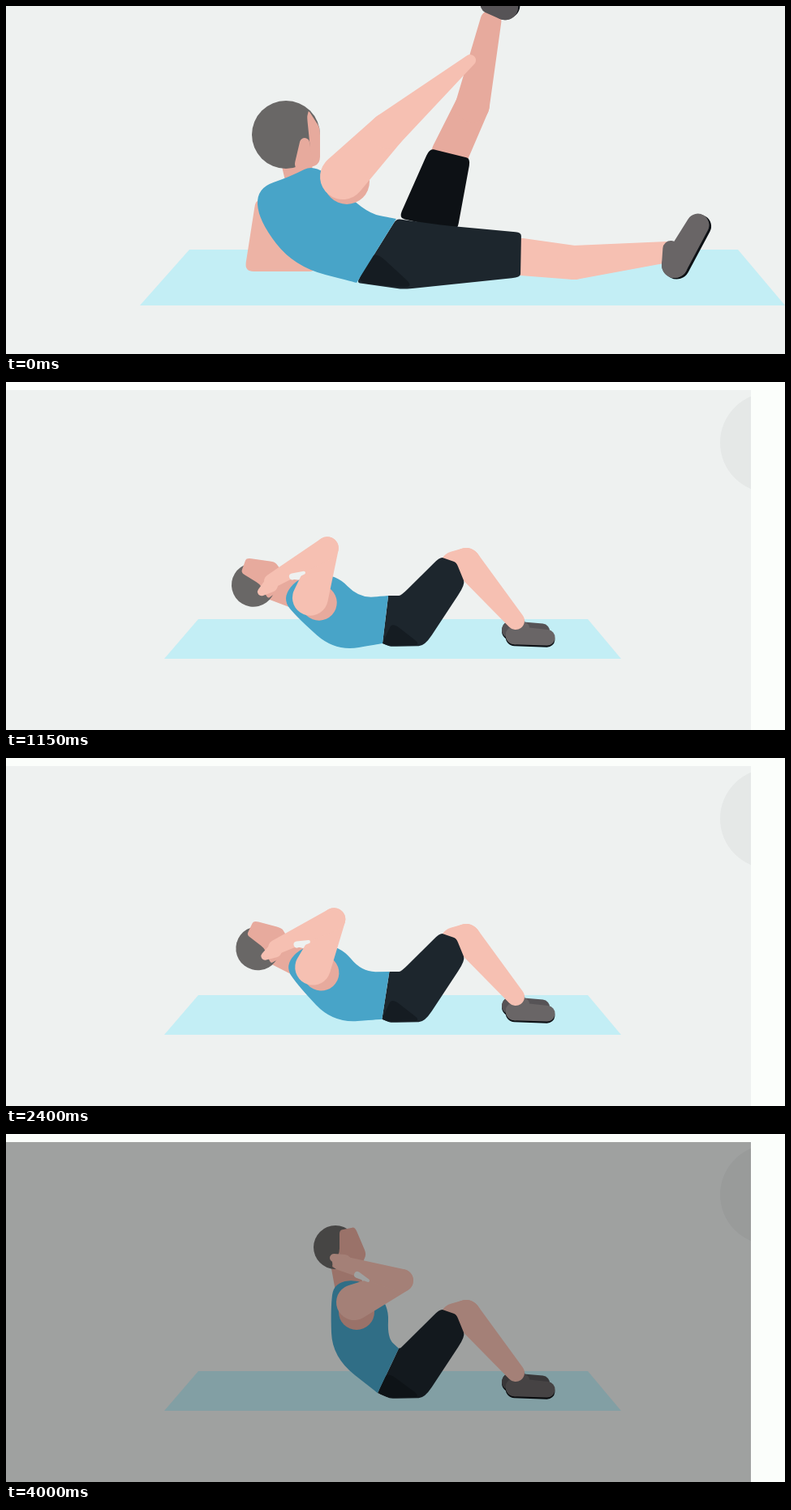
An HTML page with a canvas for the animation above (4.05 s loop, 960 by 430 pixels).

```html
<!DOCTYPE html>
<html lang="en">
<head>
<meta charset="utf-8">
<title>Floor exercises</title>
<style>
html, body { margin: 0; width: 960px; height: 430px; overflow: hidden; background: #eef1f0; }
canvas { display: block; }
</style>
</head>
<body>
<canvas id="stage" width="960" height="430"></canvas>
<script>
const ctx = document.getElementById('stage').getContext('2d');
const LOOP = 4050, CUT = 1100, DIM = 3300;
const BG = '#eef1f0', MAT = '#c3eef5', SKIN = '#f6c0b2', FAR_ARM = '#edb3a5', SHADE = '#e7aa9d';
const HAIR = '#696766', SHIRT = '#48a4c8', PANTS = '#1d262d', HIP = '#151c22', BLACK = '#0d1115';
const SHOE = '#696566', FAR_SHOE = '#565356';

const rad = deg => deg * Math.PI / 180;
const mix = (p, a, b) => a + (b - a) * p;
const between = (p, a, b) => a.map((v, i) => mix(p, v, b[i]));
const ease = (t, from, to) => {
  const k = Math.min(1, Math.max(0, (t - from) / (to - from)));
  return (1 - Math.cos(Math.PI * k)) / 2;
};
const spin = ([x, y], [cx, cy], deg) => {
  const c = Math.cos(rad(deg)), s = Math.sin(rad(deg));
  return [cx + (x - cx) * c - (y - cy) * s, cy + (x - cx) * s + (y - cy) * c];
};

function within([x, y], deg, paint) {
  ctx.save();
  ctx.translate(x, y);
  ctx.rotate(rad(deg));
  paint();
  ctx.restore();
}

function disc(color, x, y, r) {
  ctx.fillStyle = color;
  ctx.beginPath();
  ctx.arc(x, y, r, 0, 7);
  ctx.fill();
}

// Closed outline; soft 0 keeps the corners, 1 gives a smooth spline
function outline(color, soft, ...pts) {
  const n = pts.length;
  ctx.fillStyle = color;
  ctx.beginPath();
  pts.forEach((v, i) => {
    ctx.lineTo(...between(soft / 2, v, pts[(i + n - 1) % n]));
    ctx.quadraticCurveTo(...v, ...between(soft / 2, v, pts[(i + 1) % n]));
  });
  ctx.fill();
}

// Chain of round joints [x, y, radius] joined by tapering segments
function limb(color, ...joints) {
  ctx.fillStyle = color;
  for (let i = 1; i < joints.length; i++) {
    const [x1, y1, r1] = joints[i - 1], [x2, y2, r2] = joints[i];
    const a = Math.atan2(y2 - y1, x2 - x1);
    const b = Math.acos((r1 - r2) / Math.hypot(x2 - x1, y2 - y1));
    ctx.beginPath();
    ctx.arc(x1, y1, r1, a + b, a - b + 2 * Math.PI);
    ctx.arc(x2, y2, r2, a - b, a + b);
    ctx.fill();
  }
}

// Heel at the origin, toe along x, sole below
function shoe(color, heel, deg, size) {
  within(heel, deg, () => {
    ctx.scale(size, size);
    limb(BLACK, [0, 3, 16], [57, 3, 14]);
    limb(color, [15, -14, 10], [0, 0, 16], [57, 0, 14]);
  });
}

// p: 0 leg low, 1 leg raised
function legRaise(p) {
  const at = (low, high) => between(p, low, high);
  outline(MAT, 0, [226, 301], [902, 301], [960, 370], [165, 370]);
  outline(FAR_ARM, .25, [308, 238], [294, 328], [384, 328], [345, 270]);

  const head = at([318, 167], [345, 159]);
  limb(SHADE, at([328, 196, 16], [354, 188, 16]), at([366, 234, 22], [366, 222, 20]));
  disc(HAIR, ...head, 42);
  within(head, 0, () => {
    const turn = 14 * p, front = 47 - 5 * p;
    outline(SHADE, .4, [12 + turn, -22], [28, -30], [front, -8], [front, 36], [8, 48], [16 + turn, 18]);
    limb(SHADE, [2 + 1.5 * turn, 10, 6], [15 + turn / 2, 36, 11]);
  });

  // Raised leg: the knee circles the hip while the calf turns with it
  const swing = rad(mix(p, -16, -63)), reach = mix(p, 115, 104);
  const knee = [500 + reach * Math.cos(swing), 275 + reach * Math.sin(swing)];
  within(knee, -31 - 42 * p, () => {
    limb(SHADE, [0, 0, 23], [65, 9, 21], [172, 0, 13]);
    shoe(FAR_SHOE, [193, 12], -57, 1);
  });
  const cuff = mix(p, 66, 14);
  const cuffEnd = side => spin([knee[0] + 26 * side, knee[1]], knee, cuff);
  outline(BLACK, .2, at([474, 262], [484, 262]), cuffEnd(-1), cuffEnd(1), at([600, 279], [556, 278]));

  // Resting leg
  limb(SKIN, [636, 310, 23], [700, 317, 21], [815, 304, 13]);
  shoe(SHOE, [824, 320], -60, 1);
  const waist = at([474, 264], [481, 263]), seat = at([443, 345], [432, 342]);
  outline(PANTS, .15, seat, waist, [540, 271], [635, 280], [634, 335], [490, 350]);
  outline(HIP, .5, seat, [seat[0] + 22, seat[1] - 40], [505, 349]);

  outline(SHIRT, 1, waist, waist, seat, seat, [355, 322], [311, 265], [309, 225], [350, 211],
    at([390, 212], [385, 193]), at([430, 262], [440, 255]));
  const shoulder = at([369, 248, 31], [415, 211, 28]);
  disc(SHADE, shoulder[0] + 5 * p, shoulder[1] + 6 * p, shoulder[2]);
  limb(SKIN, shoulder, at([428, 300, 20], [470, 154, 22]), at([572, 239, 5], [572, 67, 7]));
}

// p: 0 lying, 1 sitting; the upper body turns about the hip, the head about the shoulder
function sitUp(p) {
  const hip = [470, 300], shoulder = [429, 208];
  const lean = -47 * (1 - p), nod = -12 * (1 - p);
  const chest = (x, y) => spin([x, y], hip, lean);
  outline(MAT, 0, [237, 293], [717, 293], [758, 342], [195, 342]);

  shoe(FAR_SHOE, [622, 306], 3, .68);
  shoe(SHOE, [627, 313], 4, .7);
  limb(SKIN, [553, 227, 18], [567, 223, 18], [628, 295, 11]);
  const waist = between(p, [471, 264], [484, 265]), seat = between(p, [464, 323], [458, 320]);
  outline(PANTS, .35, seat, seat, waist, waist, [487, 264], [535, 216], [555, 223], [566, 250], [516, 326], [474, 327]);
  outline(HIP, .5, seat, [seat[0] + 12, seat[1] - 26], [512, 325], [472, 326]);

  within(chest(...shoulder), lean + nod, () => {
    limb(SHADE, [0, 0, 20], [-15, -48, 14]);
    disc(HAIR, -23, -68, 27);
    outline(SHADE, .35, [-18, -89], [1, -93], [15, -60], [8, -42], [-14, -38], [-28, -44], [-18, -62]);
    limb(SKIN, [-25, -55, 5], [-12, -50, 9]);
  });
  outline(SHIRT, 1, waist, waist, seat, seat, chest(402, 276), chest(400, 215),
    chest(404, 183), chest(440, 180), chest(472, 210), chest(470, 252));
  within(chest(...shoulder), lean, () => {
    disc(SHADE, 3, 12, 22);
    limb(SKIN, [0, 0, 22], [59, -27, 14], [-18, -49, 9]);
    limb(BG, [4, -34, 4], [17, -27, 2]);
  });
}

function sitUpScene(t) {
  ctx.save();
  ctx.beginPath();
  ctx.rect(0, 10, 918, 420);
  ctx.clip();
  disc('#e5e8e7', 942, 75, 62);
  sitUp(ease(t, 1120, 1670) - ease(t, 1971, 2521) + ease(t, 3033, 3583));
  if (t >= DIM) {
    ctx.fillStyle = 'rgba(0,0,0,.335)';
    ctx.fillRect(0, 10, 918, 420);
  }
  ctx.restore();
  ctx.fillStyle = '#fbfefb';
  ctx.fillRect(0, 0, 960, 10);
  ctx.fillRect(918, 0, 42, 430);
}

function frame() {
  const t = performance.now() % LOOP;
  ctx.fillStyle = BG;
  ctx.fillRect(0, 0, 960, 430);
  if (t < CUT) legRaise(1 - ease(t, 0, 700));
  else sitUpScene(t);
  requestAnimationFrame(frame);
}
frame();
</script>
</body>
</html>
```
